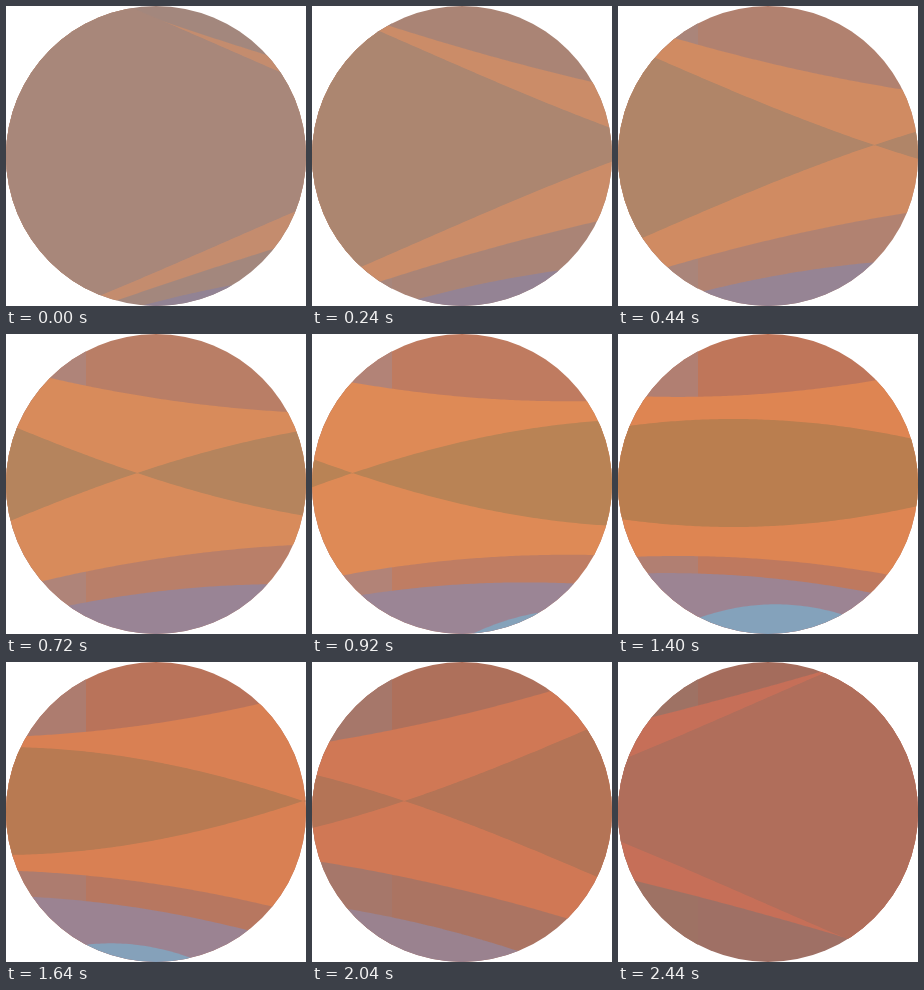
An HTML page with a canvas for the animation above (2.46 s loop, 300 by 300 pixels).

```html
<!DOCTYPE html>
<html lang="en">
<head>
<meta charset="utf-8">
<title>Crossing waves</title>
<style>
  html, body { margin: 0; width: 100%; height: 100%; overflow: hidden; background: #fff; }
  canvas { display: block; width: 300px; height: 300px; }
</style>
</head>
<body>
<canvas id="stage" width="300" height="300"></canvas>
<script>
const LOOP = 2460, STEP = 20, SIZE = 300, HALF = SIZE / 2, AXIS = 139, EDGE = 80;
const { sin, cos, abs, PI } = Math;
const ctx = document.getElementById('stage').getContext('2d');

// Colour at the start, near the middle and at the end of the loop.
const PEAK = 1140 / LOOP;
const ramp = (...stops) => stops.map(hex =>
  [0, 2, 4].map(i => parseInt(hex.slice(i, i + 2), 16)));
const colors = {
  lens:   ramp('a8877a', 'bd824c', 'b06e5b'),
  band:   ramp('c48c6e', 'e48a50', 'c66f58'),
  sky:    ramp('a3877d', 'c67859', 'a36c5c'),
  ground: ramp('a3877d', 'c67b5d', '9e7065'),
  edge:   ramp('a3877d', 'b68276', '9e7264'),
  haze:   ramp('928394', '9d8595', '98808c'),
  pool:   ramp('8fa0b4', '82a2bc', '8aa0b8')
};

function colorAt(name, p) {
  const late = p > PEAK ? 1 : 0;
  const u = late ? (p - PEAK) / (1 - PEAK) : p / PEAK;
  const from = colors[name][late], to = colors[name][late + 1];
  return `rgb(${from.map((v, i) => Math.round(v + (to[i] - v) * u))})`;
}

// s runs from -1 to 1 over the loop; each function gives a height at x.
function waves(s) {
  const crest = 185 - 590 * s + 13 * cos(PI * s);
  const lens = x => 152 * cos(0.00288 * (x - crest)) - 98;

  const swing = sin(1.3 * s);
  const reach = 81 + 3 * cos(2 * PI * s) + 41 * abs(s) ** 3.5 - 9 * s ** 5;
  const tilt = 0.02 + 0.32 * swing - 0.05 * s * s;
  const bend = 0.00043 * cos(1.3 * s);
  const band = x => reach + tilt * (x - HALF) + bend * (x - HALF) ** 2;
  const middle = 143 - 4 * s;

  const depth = 244 - 10 * s + 65 * s ** 2 + 23 * s ** 3;
  return {
    lensTop: x => AXIS - lens(x),
    lensBottom: x => AXIS + lens(x),
    bandTop: x => middle - band(x),
    bandBottom: x => middle + band(x),
    haze: x => depth + (0.04 + 0.31 * swing) * (x - HALF) + 0.00047 * (x - HALF) ** 2,
    pool: x => 268 + 120 * s * s + 0.0023 * (x - 195 + 270 * s) ** 2
  };
}

function fillBetween(upper, lower, color) {
  ctx.beginPath();
  for (let x = 0; x <= SIZE; x += 3) ctx.lineTo(x, upper(x));
  for (let x = SIZE; x >= 0; x -= 3) ctx.lineTo(x, lower(x));
  ctx.fillStyle = color;
  ctx.fill();
}

function draw(t) {
  const p = t / LOOP, w = waves(2 * p - 1);
  const color = name => colorAt(name, p);
  const floor = () => 2 * SIZE;
  const rect = (name, y, width, height) => {
    ctx.fillStyle = color(name);
    ctx.fillRect(0, y, width, height);
  };

  ctx.clearRect(0, 0, SIZE, SIZE);
  ctx.save();
  ctx.beginPath();
  ctx.arc(HALF, HALF, HALF, 0, 2 * PI);
  ctx.clip();

  rect('sky', 0, SIZE, AXIS);
  rect('ground', AXIS, SIZE, SIZE - AXIS);
  rect('edge', 0, EDGE, SIZE);
  fillBetween(w.haze, floor, color('haze'));
  fillBetween(w.pool, floor, color('pool'));
  fillBetween(w.bandTop, w.bandBottom, color('band'));
  fillBetween(w.lensTop, w.lensBottom, color('lens'));
  ctx.restore();
}

const start = performance.now();
function tick() {
  const t = (performance.now() - start) % LOOP;
  draw(Math.floor(t / STEP) * STEP);
  requestAnimationFrame(tick);
}
tick();
</script>
</body>
</html>
```
